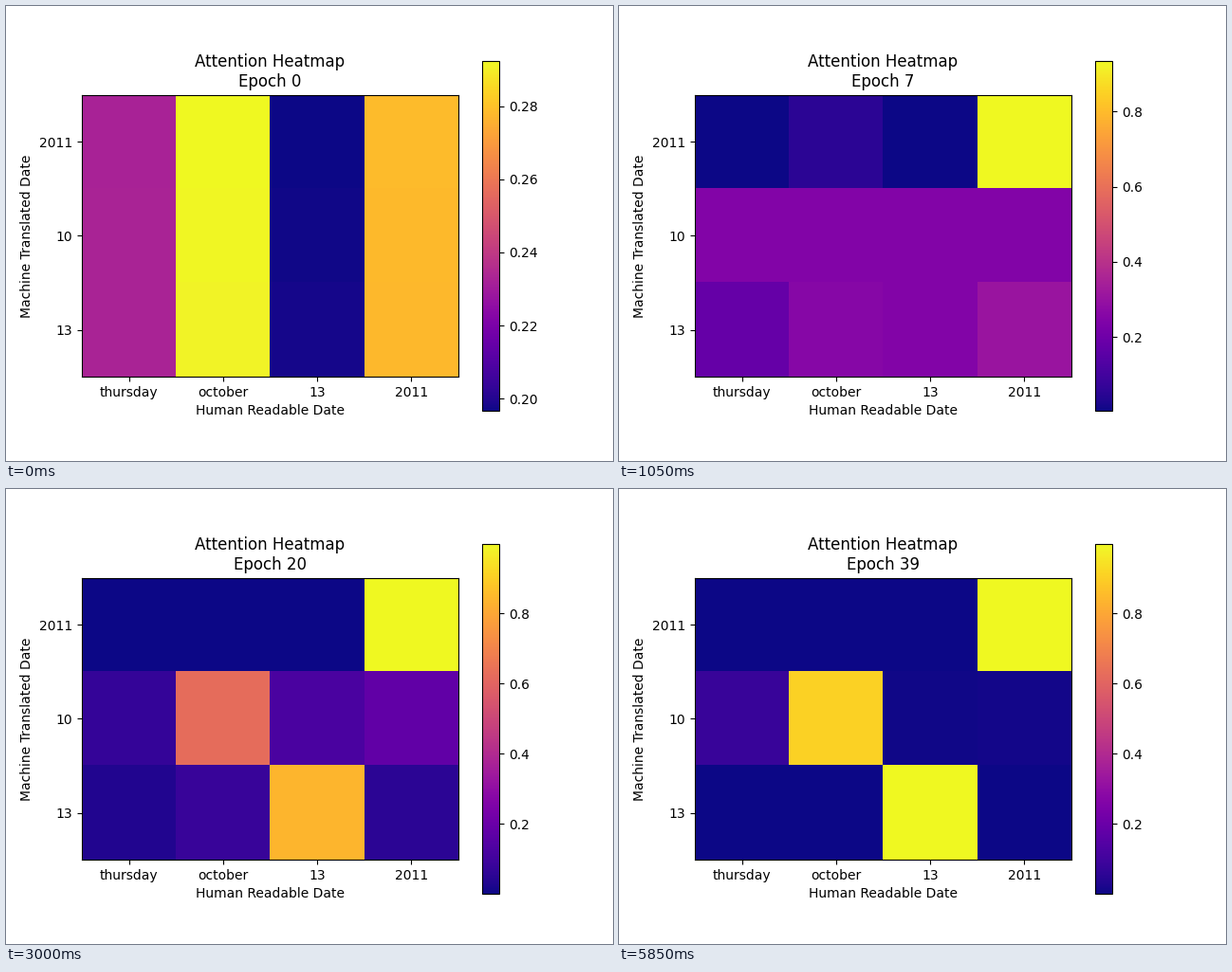
A matplotlib script that plays this animation: 640 by 480 pixels, repeating every 6000 ms.

```python
import numpy as np
import matplotlib.pyplot as plt
from matplotlib.animation import FuncAnimation

EPOCHS = 40
INTERVAL = 150
SOURCE_WORDS = ["thursday", "october", "13", "2011"]

# Weights before training, after two epochs, and on the later plateau
START = np.log([.2323, .2925, .1966, .2786])
EARLY = np.log([.104, .330, .118, .448])
EVEN = np.log([.25, .25, .25, .25])
TILTED = np.log([.18, .26, .25, .31])

# Each output word has its resting logits over time, and for every losing
# source word how far its logit falls: (drop, first epoch, last epoch, power)
ROWS = {
    "2011": ([START], {"thursday": (8.82, 0, 15, .66),
                       "october": (7.31, 0, 15, 1.212),
                       "13": (7.46, 0, 15, .66)}),
    "10": ([START, EARLY, EVEN], {"thursday": (2.45, 13, 21, 1),
                                  "13": (4.9, 13, 34, 1),
                                  "2011": (4.6, 14, 36, 1)}),
    "13": ([START, EARLY, TILTED], {"thursday": (6.5, 13.3, 28, 1),
                                    "october": (6.8, 14.6, 30, 1),
                                    "2011": (6.8, 11.5, 31, 1)}),
}
STAGE_EPOCHS = [0, 2, 7]


def fall(epoch, drop, first, last, power):
    progress = np.clip((epoch - first) / (last - first), 0, 1)
    return drop * progress ** power


def attention_row(epoch, index, stages, falls):
    epochs = STAGE_EPOCHS[:len(stages)]
    logits = np.array([np.interp(epoch, epochs, cell) for cell in zip(*stages)])
    logits *= 1 - .015 * index  # later output words are slightly flatter
    for word, ramp in falls.items():
        logits[SOURCE_WORDS.index(word)] -= fall(epoch, *ramp)
    weights = np.exp(logits)
    return weights / weights.sum()


def attention(epoch):
    return np.array([attention_row(epoch, i, *row)
                     for i, row in enumerate(ROWS.values())])


fig, ax = plt.subplots(figsize=(6.4, 4.8), dpi=100)
heatmap = ax.imshow(attention(0), cmap="plasma")
fig.colorbar(heatmap, ax=ax)
ax.set_xticks(range(len(SOURCE_WORDS)), SOURCE_WORDS)
ax.set_yticks(range(len(ROWS)), list(ROWS))
ax.set_xlabel("Human Readable Date")
ax.set_ylabel("Machine Translated Date")


def update(epoch):
    weights = attention(epoch)
    heatmap.set_data(weights)
    heatmap.set_clim(weights.min(), weights.max())
    ax.set_title(f"Attention Heatmap\nEpoch {epoch}")
    return [heatmap]


anim = FuncAnimation(fig, update, frames=EPOCHS, interval=INTERVAL,
                     repeat=True, repeat_delay=0)
plt.show()
```
